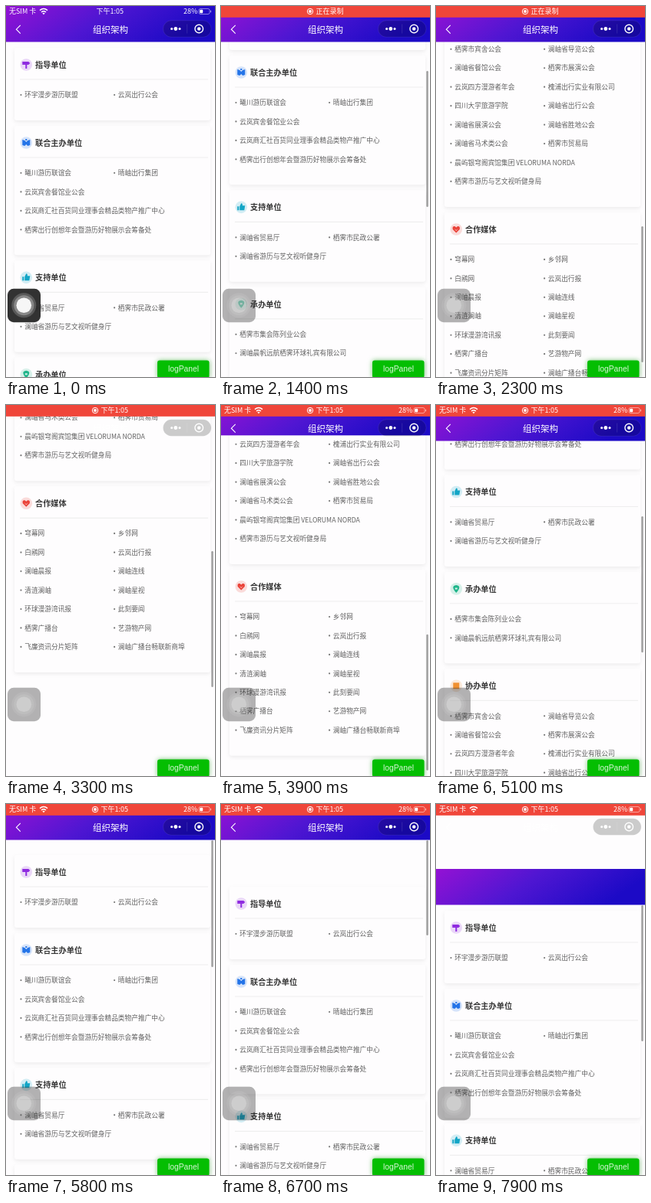
Write an HTML page that moves like this. It is 272x480 px and loops after 8 s.

```html
<!DOCTYPE html>
<html lang="zh-CN">
<head>
<meta charset="utf-8">
<title>组织架构</title>
<style>
html, body { margin: 0; width: 100%; height: 100%; overflow: hidden; background: #fff; }
svg { display: block; width: 100%; height: 100%; }
text { font-family: "Noto Sans CJK SC", "Noto Sans CJK", "Noto Sans", sans-serif; }
.row { font-size: 8.7px; fill: #606060; }
.head { font-size: 10.2px; font-weight: 700; fill: #383838; }
.card { fill: #fefdfe; filter: drop-shadow(0 2px 2.5px rgba(0,0,0,.07)); }
.status text { font-size: 9px; fill: #fff; }
.debug { font: 10.3px "Liberation Sans", Arial, sans-serif; fill: #d8f6d8; }
</style>
</head>
<body>
<svg viewBox="0 0 272 480">
  <defs>
    <linearGradient id="navFill" x2="1" y2=".25">
      <stop offset="0" stop-color="#9412d4"/>
      <stop offset=".5" stop-color="#4f16d2"/>
      <stop offset="1" stop-color="#1c0ac6"/>
    </linearGradient>
  </defs>
  <rect width="272" height="480" fill="#fefdfe"/>

  <g id="page">
    <g id="list"></g>
    <rect width="272" height="46.5" fill="url(#navFill)"/>
    <rect id="thumb" x="267.3" width="2.4" rx="1.2" fill="#000" fill-opacity=".38"/>
  </g>

  <!-- Fixed navigation controls -->
  <g fill="none" stroke="#fff">
    <path d="M18.8 24.8l-5.4 5.4 5.4 5.4" stroke-width="1.1"/>
    <rect x="204.5" y="18.8" width="62.5" height="21.4" rx="10.7" fill="#000" fill-opacity=".2" stroke-opacity=".14" stroke-width=".6"/>
    <path d="M235.7 23.5v12" stroke-opacity=".2" stroke-width=".6"/>
    <circle cx="251.2" cy="29.5" r="5.3" stroke-width="1.4"/>
  </g>
  <g fill="#fff">
    <circle cx="251.2" cy="29.5" r="2.2"/>
    <circle cx="215.6" cy="29.5" r="1.5"/>
    <circle cx="220.8" cy="29.5" r="2.4"/>
    <circle cx="226" cy="29.5" r="1.5"/>
    <text x="136" y="34.6" font-size="11.5" font-weight="500" text-anchor="middle">组织架构</text>
  </g>

  <g class="status">
    <rect id="bar" width="272" height="14.8" fill="#f0463a"/>
    <g id="sides">
      <text x="4" y="10.4">无SIM 卡</text>
      <g fill="none" stroke="#fff" stroke-width="1.5">
        <path d="M44 5.6q5-4 10 0M46 8q3-2.4 6 0"/>
      </g>
      <path d="M47.3 9.3q1.7-1.2 3.4 0l-1.7 1.9z" fill="#fff"/>
      <text x="231" y="10.4">28%</text>
      <rect x="251" y="3.5" width="14" height="7" rx="2" fill="none" stroke="#fff" stroke-opacity=".6" stroke-width=".8"/>
      <rect x="252.2" y="4.7" width="4" height="4.6" rx="1" fill="#fff"/>
      <path d="M266.5 5.7v2.6" stroke="#fff" stroke-opacity=".6"/>
    </g>
    <g id="record">
      <circle cx="116" cy="7" r="3.7" fill="none" stroke="#fff"/>
      <circle cx="116" cy="7" r="2" fill="#fff"/>
    </g>
    <text id="clock" y="10.4"></text>
  </g>

  <!-- Floating touch button -->
  <rect id="touch" x="2" y="365.8" width="43" height="43.4" rx="8" fill="#2a2a2a"/>
  <g id="rings" fill="#fff">
    <circle cx="23.3" cy="387.2" r="16" fill-opacity=".2"/>
    <circle cx="23.3" cy="387.2" r="13" fill-opacity=".3"/>
    <circle cx="23.3" cy="387.2" r="9.8"/>
  </g>

  <rect x="197" y="458.5" width="67.5" height="23" rx="3" fill="#04be02" style="filter:drop-shadow(0 0 3px rgba(4,150,2,.55))"/>
  <text class="debug" x="231" y="473" text-anchor="middle">logPanel</text>
</svg>

<script>
const LOOP = 8000, TOP = 47, VIEW = 433, MAX = 632.2, PITCH = 24.45;
const THUMB = VIEW * VIEW / (VIEW + MAX);
const $ = id => document.getElementById(id);

// Each section: title, icon tint, icon path around (0,0), rows of one or two names
const sections = [
  ['指导单位', '#8f2be0', 'M-5-4h8l2 2-2 2h-8zM-1 0h2v5h-2z', [
    '环宇漫步游历联盟|云岚出行公会']],
  ['联合主办单位', '#2474e8', 'M-5-4l3 1 2 2 2-2 3-1v7l-3 1-2-2-2 2-3-1zM-1-5h2v2h-2z', [
    '曦川游历联谊会|晴岫出行集团',
    '云岚宾舍餐馆业公会',
    '云岚商汇社百货同业理事会精品类物产推广中心',
    '栖霁出行创想年会暨游历好物展示会筹备处']],
  ['支持单位', '#12a5c6', 'M-5-1h2v5h-2zM-2-1l2-4q2 0 1.5 3h3.5l-1 6h-6z', [
    '澜岫省贸易厅|栖霁市民政公署',
    '澜岫省游历与艺文视听健身厅']],
  ['承办单位', '#1fb58a', 'M0 5q-8-9 0-10 8 1 0 10zM-1.5-1.5v2h3v-2z', [
    '栖霁市集会陈列业公会',
    '澜岫晨帆远航栖霁环球礼宾有限公司']],
  ['协办单位', '#f09030', 'M-4-4h8v8h-8z', [
    '栖霁市宾舍公会|澜岫省导览公会',
    '澜岫省餐馆公会|栖霁市展演公会',
    '云岚四方漫游者年会|槐浦出行实业有限公司',
    '四川大学旅游学院|澜岫省出行公会',
    '澜岫省展演公会|澜岫省胜地公会',
    '澜岫省马术类公会|栖霁市贸易局',
    '晨屿银穹阁宾馆集团 VELORUMA NORDA',
    '栖霁市游历与艺文视听健身局']],
  ['合作媒体', '#ea4238', 'M0 4.5l-4.5-4.5q-1-4.5 2.7-4L0-2.5l1.8-1.5q3.6-.5 2.7 4zM-2.5-1l2.5 2 2.5-2-2.5 3z', [
    '穹幕网|乡邻网',
    '白鹇网|云岚出行报',
    '澜岫晨报|澜岫连线',
    '清涟澜岫|澜岫星视',
    '环球漫游湾讯报|此刻要闻',
    '栖霁广播台|艺游物产网',
    '飞廉资讯分片矩阵|澜岫广播台畅联新商埠']]
];

function buildList() {
  let y = 76, out = '';
  for (const [title, tint, icon, rows] of sections) {
    const last = y + 39 + (rows.length - 1) * PITCH;
    out += `<rect class="card" x="11" y="${y - 22}" width="255" height="${last - y + 55}" rx="3"/>
      <path d="M18 ${y + 19}H263" stroke="#e9e9e9" stroke-width=".8"/>
      <g transform="translate(26.3 ${y})" fill="${tint}">
        <circle r="7.8" fill-opacity=".18"/><path d="${icon}" fill-rule="evenodd"/></g>
      <text class="head" x="38" y="${y + 3.8}">${title}</text>`;
    rows.forEach((row, i) => {
      const cy = y + 39 + i * PITCH;
      row.split('|').forEach((name, col) => {
        const x = 19.5 + col * 121.6;
        out += `<circle cx="${x}" cy="${cy}" r="1.1" fill="#777"/>
          <text class="row" x="${x + 4.7}" y="${cy + 3.2}">${name}</text>`;
      });
    });
    y = last + 62;
  }
  $('list').innerHTML = out;
}

// Eased value at time t along [time, value] keys
function track(keys, t) {
  const i = keys.findIndex(k => k[0] > t);
  if (i < 0) return keys[keys.length - 1][1];
  if (i === 0) return keys[0][1];
  const [t0, a] = keys[i - 1], [t1, b] = keys[i], u = (t - t0) / (t1 - t0);
  return a + (b - a) * u * u * (3 - 2 * u);
}

const scrollKeys = [[600, 0], [1400, 91], [2500, MAX], [4000, MAX], [4400, MAX + 5], [5600, 0],
  [5800, -12], [6600, -53], [6750, -53], [7200, 0]];
const pullKeys = [[2600, 0], [3200, -115], [3350, -115], [4000, 0], [4400, 5], [4700, 0],
  [7250, 0], [7900, 84]];
const touchKeys = [[200, .96], [1200, .36]];
const thumbKeys = [[500, 0], [700, 1]];
const sideKeys = [[500, 1], [700, 0], [3400, 0], [3700, 1]];

function draw(t) {
  const scroll = track(scrollKeys, t);
  const top = Math.min(MAX, Math.max(0, scroll));
  const touch = track(touchKeys, t);
  const started = t >= 600, label = started && t < 3100;

  $('page').setAttribute('transform', `translate(0 ${track(pullKeys, t)})`);
  $('list').setAttribute('transform', `translate(0 ${-scroll})`);
  $('thumb').setAttribute('y', TOP + top * THUMB / VIEW);
  $('thumb').setAttribute('height', THUMB - Math.abs(scroll - top));
  $('thumb').setAttribute('opacity', track(thumbKeys, t));
  $('touch').setAttribute('opacity', touch);
  $('rings').setAttribute('opacity', touch);
  $('sides').setAttribute('opacity', track(sideKeys, t));
  $('bar').setAttribute('opacity', started ? 1 : 0);
  $('record').setAttribute('opacity', started ? 1 : 0);
  $('clock').setAttribute('x', started ? 123.5 : 117.5);
  $('clock').textContent = label ? '正在录制' : '下午1:05';
}

buildList();
const start = performance.now();
function tick() {
  draw((performance.now() - start) % LOOP);
  requestAnimationFrame(tick);
}
tick();
</script>
</body>
</html>
```
